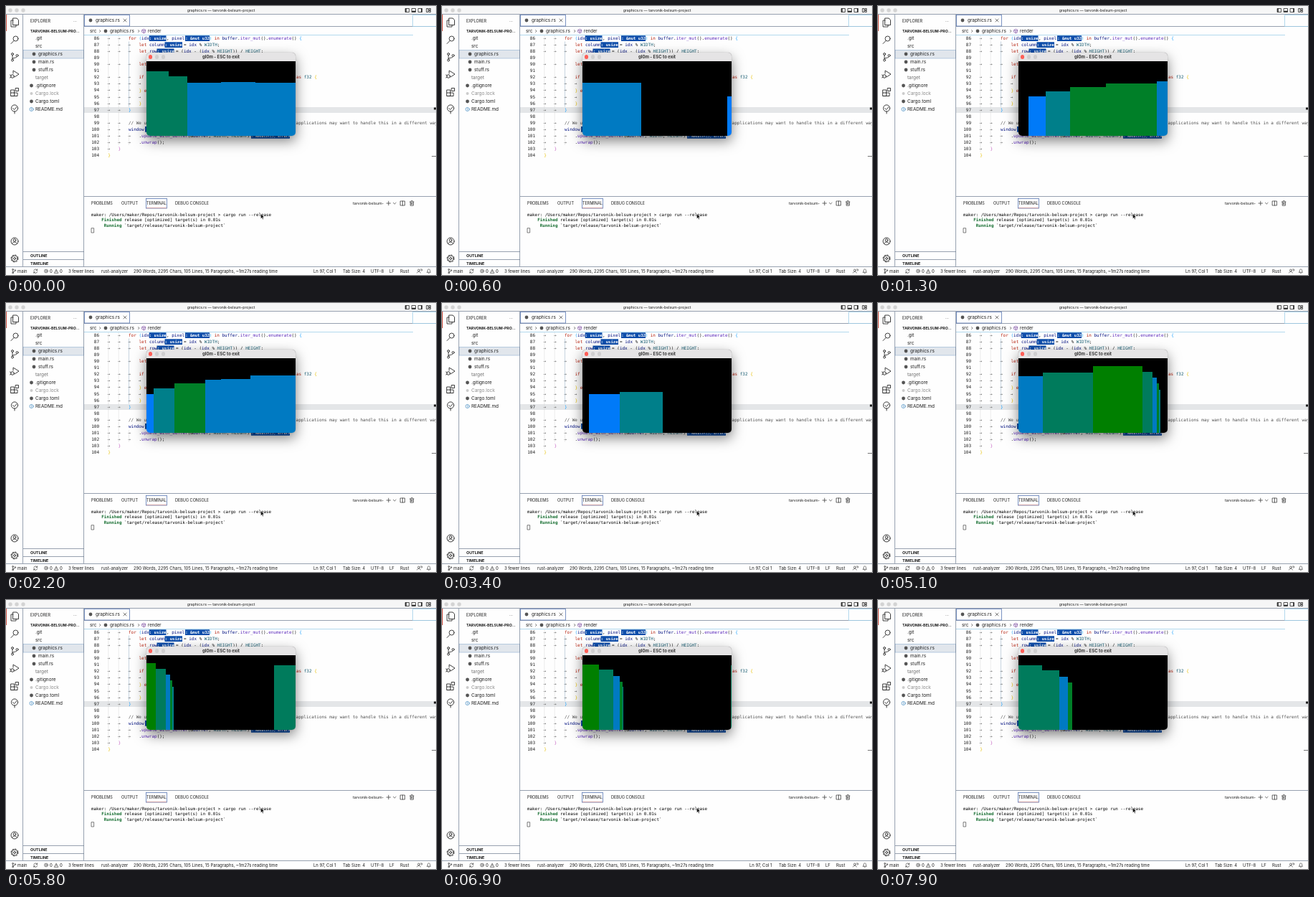
Animation, 600 px wide and 375 px high, one loop 8000 ms. Source, as an HTML page with a canvas:

```html
<!DOCTYPE html>
<html lang="en">
<head>
<meta charset="utf-8">
<title>Raycaster in an editor</title>
<style>
html, body { margin: 0; width: 100%; height: 100%; overflow: hidden; background: #fefefe; }
#stage { position: relative; width: 600px; height: 375px; overflow: hidden; }
svg { position: absolute; inset: 0; }
text { font-family: Inter, "Open Sans", sans-serif; font-size: 6.4px; fill: #1c1c1c; white-space: pre; }
.small text { font-size: 5.5px; }
.status text { font-size: 5.95px; }
.bold text { font-weight: 700; font-size: 5.4px; }
.code text { font-family: "DejaVu Sans Mono", monospace; font-size: 5.98px; }
.term text { font-family: "DejaVu Sans Mono", monospace; font-size: 5.88px; fill: #000; }
.code .hint { font-size: 5.6px; font-weight: 700; fill: #fff; }
.code .num { text-anchor: end; }
.code .tab { fill: #555; }
.key { fill: #b5200d; }
.fn { fill: #5e2cbc; }
.var { fill: #001080; }
.type { fill: #185e73; }
.gold { fill: #e6bf00; }
.orchid { fill: #c565c2; }
.blue { fill: #179fff; }
.note { fill: #515151; }
text.dim { fill: #8a8a8a; }
.term .ok { fill: #136c2e; font-weight: 700; }
.line { fill: none; stroke: #6c7a90; stroke-width: .7; }
.pale { fill: none; stroke: #9fd0ea; stroke-width: .8; }
.focus { fill: none; stroke: #5a78b4; stroke-width: .8; }
.icon { fill: none; stroke: #292929; stroke-width: .8; stroke-linejoin: round; stroke-linecap: round; }
.dot { fill: #555; }
#game {
  position: absolute; left: 196px; top: 65px; width: 208px; height: 116px;
  border-radius: 5px; overflow: hidden; background: #e5e4e5;
  box-shadow: 0 0 1px rgba(0,0,0,.5), 0 7px 18px rgba(0,0,0,.5);
}
#game canvas { position: absolute; left: 0; top: 12px; }
#game p {
  margin: 0; text-align: center; color: #333;
  font: 700 6px/12px Inter, "Open Sans", sans-serif;
}
#game i { position: absolute; top: 3.4px; width: 5.2px; height: 5.2px; border-radius: 50%; background: #cfcecf; }
</style>
</head>
<body>
<div id="stage">
<svg width="600" height="375" viewBox="0 0 600 375">
  <rect width="600" height="11.500" fill="#f6f6f6"/>
  <g fill="#d3d3d3">
    <circle cx="6" cy="6" r="2.700"/><circle cx="15" cy="6" r="2.700"/><circle cx="24" cy="6" r="2.700"/>
  </g>
  <text x="300" y="8" text-anchor="middle" style="font-size:5.2px">graphics.rs — tarvonik-belsum-project</text>
  <g class="icon">
    <path d="M557.500 3.500h5v5h-5zM566.500 3.500h5v5h-5zM575.500 3.500h5v5h-5zM587 3.500h2v5h-2zM590.500 3.500h2v2h-2zM590.500 6.500h2v2h-2z"/>
    <path d="M558 4v4M567 7.500h4M580 4v4" stroke-width="1.600"/>
  </g>

  <rect x="109" y="141" width="491" height="8" fill="#e4e6e8"/>
  <rect x="24" y="61.500" width="84.500" height="11.500" fill="#e1e6ec" stroke="#8fb0d0" stroke-width=".6"/>
  <path class="line" d="M0 11.500h600M23.500 12v351M108.500 12v351M109 28.500h491M109 265.500h491M0 363.500h600M24 342.500h85M24 353.500h85"/>
  <path class="pale" d="M109 40.500h459M600 12.500h-32.500v16h32.500"/>
  <rect class="focus" x="109.500" y="12.500" width="63" height="15.500"/>
  <path d="M.5 12v23" stroke="#d0594b" stroke-width="1"/>
  <path d="M597 143h3" stroke="#222" stroke-width="3"/>
  <path d="M594 209.500h6" stroke="#555" stroke-width=".8"/>

  <g class="icon" style="stroke-width:.9">
    <path d="M10 17h5l2.500 2.500v7h-7.500zM10 20H7v9h7v-2.500"/>
    <circle cx="13.500" cy="45.500" r="3.500"/><path d="M11 48.500l-4 4"/>
    <circle cx="9" cy="67" r="1.500"/><circle cx="9" cy="75.500" r="1.500"/><circle cx="15.500" cy="69" r="1.500"/>
    <path d="M9 68.500v5.500M15.500 70.500c0 2.500-6.500 1-6.500 3.500"/>
    <path d="M10 94v-4l8 5-6 4"/><circle cx="9" cy="98" r="2.300"/><path d="M5.500 96l1.500 1M5.500 100l1.500-1"/>
    <path d="M7 117h4.500v8.500H7zM7 121h9v4.500H7M13.500 114.500h4v4h-4z"/>
    <circle cx="12" cy="142.500" r="4.600"/><path d="M9.500 142.500l2 2 3.500-3.800M12 147v3"/>
    <circle cx="12" cy="328" r="5"/><circle cx="12" cy="326.500" r="1.800"/><path d="M8.500 331.500c1-3.500 6-3.500 7 0"/>
    <circle cx="12" cy="352" r="4"/><circle cx="12" cy="352" r="1.500"/>
    <circle cx="12" cy="352" r="5" stroke-dasharray="1.700 2.230"/>
  </g>

  <g class="small"><text x="34" y="22.500">EXPLORER</text><text x="94" y="22.500">···</text></g>
  <g class="bold">
    <text x="34" y="37" style="font-size:5.2px">TARVONIK-BELSUM-PRO...</text>
    <text x="34" y="350">OUTLINE</text>
    <text x="34" y="361">TIMELINE</text>
  </g>
  <text x="41" y="47.300">.git</text>
  <text x="41" y="58.300">src</text>
  <text x="45" y="69.300">graphics.rs</text>
  <text x="45" y="80.300">main.rs</text>
  <text x="45" y="91.300">stuff.rs</text>
  <text x="41" y="102.300" style="fill:#6e6e6e">target</text>
  <text x="41" y="113.300">.gitignore</text>
  <text x="41" y="124.300" class="dim">Cargo.lock</text>
  <text x="41" y="135.300">Cargo.toml</text>
  <text x="41" y="146.300">README.md</text>
  <g class="dot">
    <circle cx="39" cy="67" r="2.400"/><circle cx="39" cy="78" r="2.400"/><circle cx="39" cy="89" r="2.400"/>
    <circle cx="35.500" cy="111" r="2.400"/><circle cx="35.500" cy="122" r="2" fill="#ccc"/><circle cx="35.500" cy="133" r="2.400"/>
    <circle cx="118" cy="20" r="2.400"/><circle cx="139" cy="35" r="2.400"/>
  </g>
  <g class="icon" style="stroke-width:.6">
    <path d="M35.500 143.700v1.500M35.500 142.500v.1" stroke="#2b7bb9"/><circle cx="35.500" cy="144" r="2.600" stroke="#2b7bb9"/>
    <path d="M164 18l4 4M168 18l-4 4M130.500 33.500l1.500 1.500-1.500 1.500M184.500 33.500l1.500 1.500-1.500 1.500"/>
    <path d="M190 33.500l2.300-1.200 2.300 1.200v3l-2.300 1.200-2.300-1.200zM190 33.500l2.300 1.200 2.300-1.200M192.300 34.700v3" stroke="#652d90"/>
  </g>
  <text x="125" y="22.300">graphics.rs</text>
  <text x="117" y="37.300">src</text>
  <text x="145" y="37.300">graphics.rs</text>
  <text x="198" y="37.300" style="font-size:6px">render</text>

  <g class="code">
    <g id="gutter"></g>
    <path d="M171.500 49.500v91" stroke="#8fa8c0" stroke-width=".5"/>
    <path d="M157.200 41v153M142.800 41v162M171.500 177v17" stroke="#d2d2d2" stroke-width=".4"/>
    <path d="M199.700 41.300h23.800v7.700h-23.800zM250 41.300h34v7.700h-34zM221.500 50.300h24.500v7.700h-24.500zM210.500 59.400h24v7.700h-24zM194 168h3v7.700h-3zM342 177h54v7.700h-54z" fill="#0d4daa"/>
    <text x="171" y="47"><tspan class="key">for</tspan> <tspan class="blue">(</tspan><tspan class="var">idx</tspan></text>
    <text x="199.800" y="47" class="hint">: usize</text>
    <text x="224" y="47">, <tspan class="var">pixel</tspan></text>
    <text x="250.200" y="47" class="hint">: &amp;mut u32</text>
    <text x="283.500" y="47"><tspan class="blue">)</tspan> <tspan class="key">in</tspan> <tspan class="var">buffer</tspan>.<tspan class="fn">iter_mut</tspan>().<tspan class="fn">enumerate</tspan>() <tspan class="blue">{</tspan></text>
    <text x="185.500" y="56.100"><tspan class="key">let</tspan> <tspan class="var">column</tspan></text>
    <text x="222" y="56.100" class="hint">: usize</text>
    <text x="244.500" y="56.100"> = <tspan class="var">idx</tspan> % <tspan class="type">WIDTH</tspan>;</text>
    <text x="185.500" y="65.200"><tspan class="key">let</tspan> <tspan class="var">row</tspan></text>
    <text x="211" y="65.200" class="hint">: usize</text>
    <text x="233.500" y="65.200"> = (<tspan class="var">idx</tspan> - (<tspan class="var">idx</tspan> % <tspan class="type">HEIGHT</tspan>)) / <tspan class="type">HEIGHT</tspan>;</text>
    <text x="185.500" y="83.300" class="key">let</text>
    <text x="185.500" y="101.400" class="key">if</text>
    <text x="405" y="101.400"><tspan class="key">as</tspan> <tspan class="type">f32</tspan> <tspan class="gold">{</tspan></text>
    <text x="185.500" y="119.500"><tspan class="gold">}</tspan> <tspan class="key">else</tspan></text>
    <text x="185.500" y="137.600" class="gold">}</text>
    <text x="171" y="146.700" class="blue">}</text>
    <text x="171" y="164.800" class="note">// We unwrap here as we want this code to exit if it fails. Real applications may want to handle this in a different way</text>
    <text x="171" y="173.900" class="var">window</text>
    <text x="185.500" y="182.900">.<tspan class="fn">update_with_buffer</tspan>(&amp;<tspan class="var">buffer</tspan>, <tspan class="type">WIDTH</tspan>, <tspan class="type">HEIGHT</tspan>)</text>
    <text x="342.500" y="182.900" class="hint" style="font-size:4.700px">: Result&lt;(), Error&gt;</text>
    <text x="185.500" y="192">.<tspan class="fn">unwrap</tspan>();</text>
    <text x="156.600" y="201.100" class="orchid">}</text>
    <text x="142.200" y="210.100" class="gold">}</text>
  </g>

  <g class="small">
    <text x="119" y="277.300">PROBLEMS</text>
    <text x="161" y="277.300">OUTPUT</text>
    <text x="196" y="277.300">TERMINAL</text>
    <text x="236" y="277.300">DEBUG CONSOLE</text>
    <text x="484" y="277.300" style="font-size:5.3px">tarvonik-belsum-</text>
  </g>
  <rect class="focus" x="195.500" y="268.500" width="29" height="13.500"/>
  <path d="M196 281.500h28" stroke="#d98076" stroke-width=".6"/>
  <g class="icon" style="stroke-width:.7">
    <path d="M531 275h5.500M533.800 272.200v5.500M540.500 274.300l1.800 1.700 1.800-1.700M550.500 272h6v6h-6zM553.500 272v6M563.500 273h5.500M564.200 273v5.200h4.200V273M565.300 271.700h2M565.500 274.500v2.200M567 274.500v2.200"/>
  </g>
  <g class="term">
    <text x="119" y="292.700">maker: /Users/maker/Repos/tarvonik-belsum-project &gt; cargo run --release</text>
    <text x="119" y="300.200">    <tspan class="ok">Finished</tspan> release [optimized] target(s) in 0.01s</text>
    <text x="119" y="307.700">     <tspan class="ok">Running</tspan> `target/release/tarvonik-belsum-project`</text>
  </g>
  <rect x="119.400" y="309.700" width="3.200" height="6.300" class="icon" style="stroke-width:.6"/>
  <path d="M355.500 289.500v7l1.600-1.400 1.100 2.500 1.100-.5-1.100-2.400h2.100z" fill="#111" stroke="#fff" stroke-width=".4"/>

  <g class="status">
    <text x="16" y="371.700">main</text>
    <text x="61" y="371.700">0</text>
    <text x="75" y="371.700">0</text>
    <text x="87" y="371.700">3 fewer lines</text>
    <text x="133" y="371.700">rust-analyzer</text>
    <text x="178" y="371.700">290 Words, 2295 Chars, 105 Lines, 15 Paragraphs, ~1m27s reading time</text>
    <text x="429" y="371.700">Ln 97, Col 1</text>
    <text x="470" y="371.700">Tab Size: 4</text>
    <text x="509" y="371.700">UTF-8</text>
    <text x="535" y="371.700">LF</text>
    <text x="550" y="371.700">Rust</text>
  </g>
  <g class="icon" style="stroke-width:.6">
    <circle cx="9.500" cy="367.300" r=".9"/><circle cx="9.500" cy="372" r=".9"/><circle cx="12.700" cy="368.500" r=".9"/>
    <path d="M9.500 368.200v2.900M12.700 369.400c0 1.300-3.200.5-3.200 1.700"/>
    <path d="M38.800 369a2.500 2.500 0 0 1 4.700-.7M43.600 370.300a2.500 2.500 0 0 1-4.700.7M42 368.500h1.700v-1.700M40.500 370.800h-1.700v1.600"/>
    <circle cx="56" cy="369.500" r="2.400"/><path d="M55 368.500l2 2M57 368.500l-2 2M67.500 372l2.600-4.800 2.600 4.800zM70.100 369v1.500"/>
    <circle cx="576" cy="368.500" r="1.500"/><path d="M573.500 372c.5-2.300 4.500-2.300 5 0M578.500 367h2v2h-1"/>
    <path d="M587.500 371.300h5l-.8-1.200v-1.500c0-2.200-3.400-2.200-3.400 0v1.500zM589.500 372.300h1"/>
  </g>
</svg>
<div id="game">
  <p>gl0m - ESC to exit</p>
  <i style="left:3px;background:#ff5f57"></i><i style="left:11.500px"></i><i style="left:20.500px"></i>
  <canvas width="208" height="104"></canvas>
</div>
</div>
<script>
const LOOP = 8000, STEP = 100;
const LEFT = 196, TOP = 77, RIGHT = 404, FLOOR = 181;

// Indent depth of the lines 86 to 104.
const indents = "2330303434320223310";
document.getElementById("gutter").innerHTML = [...indents].map((depth, i) => {
  const y = 47 + i * 9.06;
  let row = `<text class="num" x="130" y="${y}">${86 + i}</text>`;
  for (let d = 0; d < depth; d++) row += `<text class="tab" x="${141.5 + d * 14.4}" y="${y}">→</text>`;
  return row;
}).join("");

// Each wall is [left edge, top]; it runs to the next edge. A top at FLOOR is empty space.
// pan: the next view slides in from that far to the right; without it, edges move one to one.
const views = [
  { at: 0, pan: 350, walls: [[140, 91], [227, 98], [253, 107], [300, 106], [348, 107], [440, FLOOR]] },
  { at: 1300, walls: [[210, 126], [234, 119], [268, 113], [318, 108], [350, 108], [389, 105], [480, FLOOR]] },
  { at: 2200, pan: 300, walls: [[180, 127], [206, 119], [235, 112], [278, 106.5], [300, 105.5], [341, 101], [430, FLOOR]] },
  { at: 3400, walls: [[205, 127], [248, 124], [308, FLOOR], [420, 116], [447, 109], [482, 102], [553, 97]] },
  { at: 4400, pan: 320, walls: [[140, 118], [160, 112], [212, FLOOR], [257, 116], [284, 109], [319, 102], [390, 97]] },
  { at: 5800, walls: [[140, 88], [209, 96], [223, 104], [229, 112], [232, 121], [234, FLOOR], [374, 91]] },
  { at: 7900, walls: [[140, 91], [229, 98], [253, 107], [265, 115], [271, 121], [271, FLOOR], [430, 91]] }
];

// Wall colour follows its distance, hence its top.
const shades = [[90, "#007f00"], [100, "#007b5c"], [107.5, "#007ac2"], [115.5, "#007f28"], [125, "#007f8a"], [180, "#007af8"], [999, "#000"]];
const shade = top => shades.find(([limit]) => top < limit)[1];

const ctx = document.querySelector("canvas").getContext("2d");
const mix = (a, b, p) => a + (b - a) * p;
const shift = (walls, dx) => walls.map(([x, top]) => [x + dx, top]);

function wallsAt(t) {
  const i = views.findLastIndex(v => v.at <= t);
  const a = views[i], b = views[i + 1];
  if (!b) return a.walls;
  const p = (t - a.at) / (b.at - a.at);
  if (a.pan) return [...shift(a.walls, -a.pan * p), ...shift(b.walls, a.pan * (1 - p))];
  return a.walls.map(([x, top], k) => [mix(x, b.walls[k][0], p), mix(top, b.walls[k][1], p)]);
}

function draw(t) {
  const walls = wallsAt(t);
  ctx.fillStyle = "#000";
  ctx.fillRect(0, 0, RIGHT - LEFT, FLOOR - TOP);
  walls.forEach(([x, top], k) => {
    const start = Math.round(Math.max(x, LEFT));
    const end = Math.round(Math.min(k + 1 < walls.length ? walls[k + 1][0] : RIGHT, RIGHT));
    if (end <= start) return;
    ctx.fillStyle = shade(top);
    ctx.fillRect(start - LEFT, Math.round(top) - TOP, end - start, FLOOR - Math.round(top));
  });
}

const begin = performance.now();
function tick() {
  const t = (performance.now() - begin) % LOOP;
  draw(Math.floor(t / STEP) * STEP);
  requestAnimationFrame(tick);
}
tick();
</script>
</body>
</html>
```
